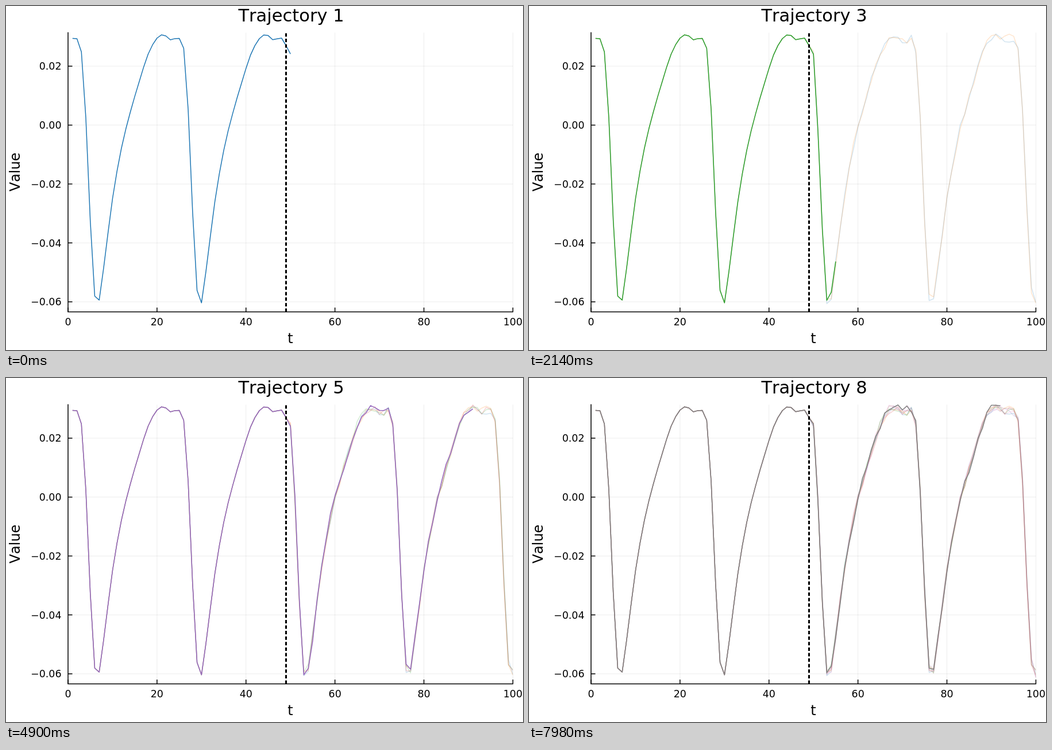
Write an HTML page that moves like this. It is 900 px wide and 600 px high and loops after 8000 ms.

```html
<!DOCTYPE html>
<html lang="en">
<head>
<meta charset="utf-8">
<title>Trajectories</title>
<style>
  html, body { margin: 0; width: 100%; height: 100%; overflow: hidden; background: #fff; }
  svg { display: block; width: 100%; height: 100%; }
  text { font-family: "DejaVu Sans", sans-serif; font-size: 17.45px; font-kerning: none; fill: #000; }
  .axis { stroke: #000; stroke-width: 1.5; fill: none; }
  .grid { stroke: #000; stroke-opacity: .1; stroke-width: .75; fill: none; }
  .line { fill: none; stroke-width: 1.5; stroke-linejoin: round; }
</style>
</head>
<body>
<svg viewBox="0 0 900 600">
  <defs><clipPath id="plot"><rect x="108" y="46" width="774.5" height="487.5"/></clipPath></defs>
  <g id="frame"></g>
  <g id="lines" clip-path="url(#plot)"></g>
  <path d="M487.5 533.5V46.5" stroke="#000" stroke-width="3" stroke-dasharray="6 3.6" fill="none"/>
  <text id="title" x="496.5" y="27.3" text-anchor="middle" style="font-size:30.5px"></text>
  <text x="495" y="588" text-anchor="middle" style="font-size:24px">t</text>
  <text transform="translate(23.7 289.5) rotate(-90)" text-anchor="middle" style="font-size:24px">Value</text>
</svg>
<script>
const STEP = 20, FRAMES = 400, FIRST = 50, LAST = 100;
const SPAN = LAST - FIRST + 1;
const PERIOD = 23.1, SLIP = 0.7, NOISE = 10;
const TOP = 47, BOTTOM = 531;
const COLORS = ['#1f77b4', '#ff7f0e', '#2ca02c', '#d62728', '#9467bd', '#8c564b', '#e377c2', '#7f7f7f'];

// One cycle of the wave: [phase, height on the stage]
const cycle = [
  [2, 57], [3, 80], [4, 195], [5, 375], [6, 506], [6.6, 525], [7, 513], [8, 457], [10, 336],
  [12, 248], [14, 185], [16, 132], [18, 84], [20, 56], [21.5, 50], [23, 59]
];

const px = t => 108 + t * 7.744;
const py = v => 207.7 - v * 5138;

// The i-th key, with the cycle repeated on both sides
function key(i) {
  const n = cycle.length, turn = Math.floor(i / n);
  const [u, y] = cycle[i - turn * n];
  return [u + turn * PERIOD, y];
}

function slope(i) {
  const [a, ya] = key(i - 1), [b, yb] = key(i + 1);
  return (yb - ya) / (b - a);
}

// Smooth periodic curve through the keys (cubic Hermite)
function wave(t) {
  const start = cycle[0][0];
  const u = start + ((t - start) % PERIOD + PERIOD) % PERIOD;
  let i = 0;
  while (key(i + 1)[0] <= u) i++;
  const [a, ya] = key(i), [b, yb] = key(i + 1);
  const w = b - a, s = (u - a) / w, r = 1 - s;
  return r * r * (1 + 2 * s) * ya + s * s * (3 - 2 * s) * yb
    + w * s * r * (r * slope(i) - s * slope(i + 1));
}

function random(seed) {
  return () => (seed = seed * 16807 % 2147483647) / 2147483647;
}

// Runs share the history; each forecast lags slightly and has its own noise
function makeRun(_, i) {
  const rnd = random(4201 + i * 977);
  return Array.from({ length: LAST }, (_, k) => {
    const t = k + 1;
    let y = wave(t);
    if (t >= FIRST) {
      y = wave(t - SLIP) + (rnd() + rnd() - 1) * NOISE;
      y = Math.max(TOP, Math.min(BOTTOM, y));
    }
    return px(t).toFixed(2) + ',' + y.toFixed(1);
  });
}

function add(parent, tag, attrs, text) {
  const el = document.createElementNS('http://www.w3.org/2000/svg', tag);
  for (const name in attrs) el.setAttribute(name, attrs[name]);
  if (text) el.textContent = text;
  return parent.appendChild(el);
}

const frame = document.getElementById('frame');
const linesGroup = document.getElementById('lines');
const title = document.getElementById('title');

for (let t = 0; t <= 100; t += 20) {
  const x = px(t);
  add(frame, 'path', { class: 'grid', d: `M${x} 46.5V533.5` });
  add(frame, 'path', { class: 'axis', d: `M${x} 533.5v-7.5` });
  add(frame, 'text', { x, y: 557, 'text-anchor': 'middle' }, String(t));
}
for (let i = -3; i <= 1; i++) {
  const v = i * 0.02, y = py(v);
  add(frame, 'path', { class: 'grid', d: `M108 ${y}H882.4` });
  add(frame, 'path', { class: 'axis', d: `M108 ${y}h7.5` });
  add(frame, 'text', { x: 96.5, y: y + 6.3, 'text-anchor': 'end' }, (v < 0 ? '\u2212' : '') + Math.abs(v).toFixed(2));
}
add(frame, 'path', { class: 'axis', d: 'M108 45.8V533.5H883' });

const runs = COLORS.map(makeRun);
const lines = COLORS.map(stroke => add(linesGroup, 'polyline', { class: 'line', stroke }));

function render(ms) {
  const n = Math.floor(ms / STEP + 1e-6) % FRAMES;
  const current = Math.floor(n / SPAN);
  const end = FIRST + n % SPAN;
  title.textContent = 'Trajectory ' + (current + 1);
  lines.forEach((line, i) => {
    const count = i < current ? LAST : i === current ? end : 0;
    line.setAttribute('points', runs[i].slice(0, count).join(' '));
    line.setAttribute('stroke-opacity', i < current ? 0.2 : 1);
  });
}

function tick() {
  render(performance.now());
  requestAnimationFrame(tick);
}
tick();
</script>
</body>
</html>
```
